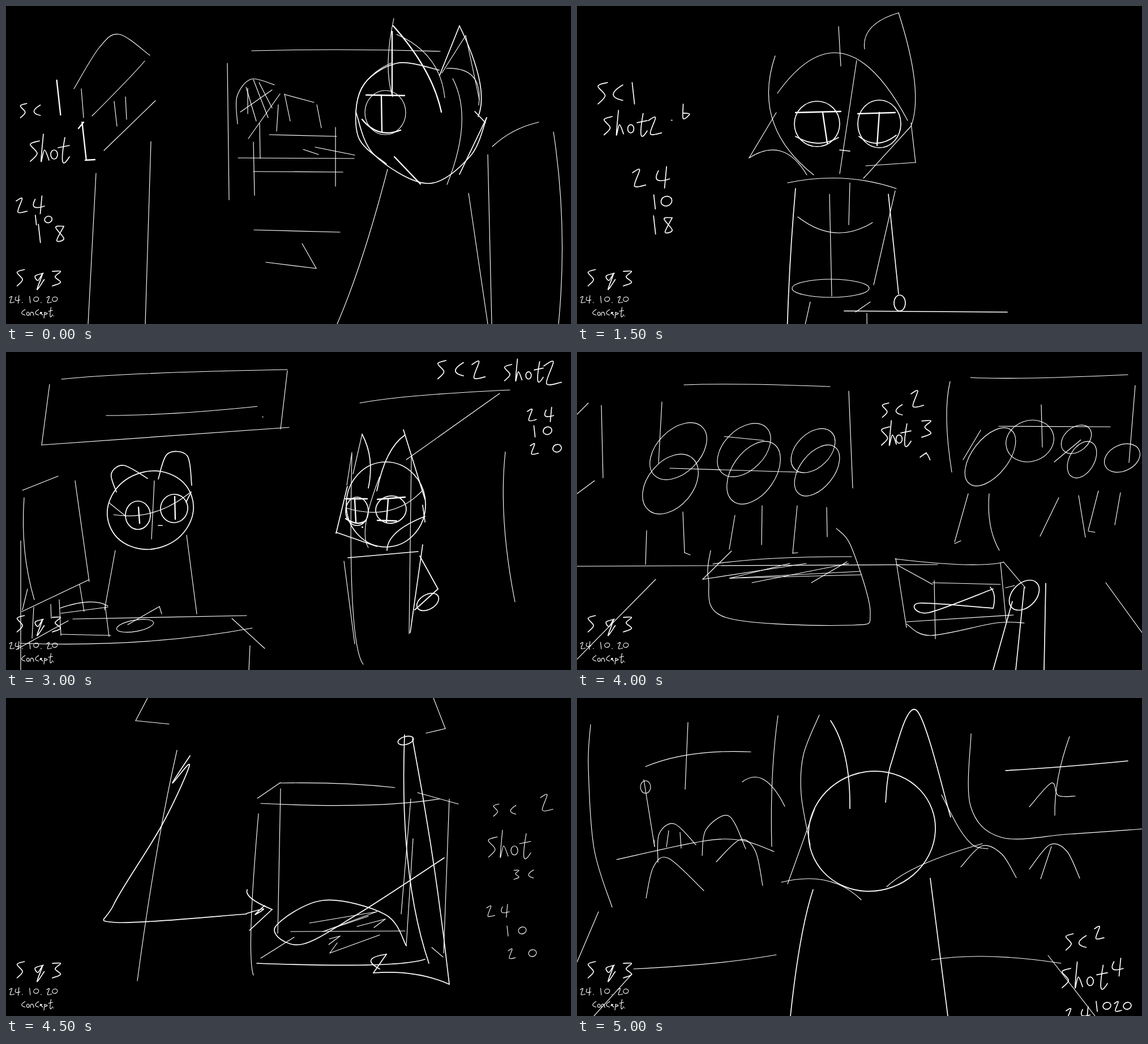
Animation of 998x561 px, one loop 6000 ms. Source, as an HTML page:

```html
<!DOCTYPE html>
<html lang="en">
<head>
<meta charset="utf-8">
<title>Storyboard sketch</title>
<style>
html, body { margin: 0; width: 100%; height: 100%; overflow: hidden; background: #000; }
svg { display: block; width: 100%; height: 100%; }
path, ellipse { fill: none; stroke: #fff; stroke-linecap: round; stroke-linejoin: round; vector-effect: non-scaling-stroke; }
</style>
</head>
<body>
<svg id="stage" viewBox="0 0 998 561"></svg>
<script>
// Line, parabola or smooth curve through the points
function curve(str) {
  const p = str.split(' ').map(q => q.split(',').map(Number));
  const [a, m, b] = p;
  if (p.length === 2) return `<path d="M${a}L${m}"`;
  if (p.length === 3) {
    const c = m.map((v, i) => 2 * v - (a[i] + b[i]) / 2);
    return `<path d="M${a}Q${c} ${b}"`;
  }
  const d = p.slice(1).map((q, i) => {
    const r = p[i], before = p[i - 1] || r, after = p[i + 2] || q;
    const h1 = r.map((v, k) => v + (q[k] - before[k]) / 6);
    const h2 = q.map((v, k) => v - (after[k] - r[k]) / 6);
    return `C${h1} ${h2} ${q}`;
  });
  return `<path d="M${a}${d.join('')}"`;
}

// "o cx cy rx ry angle"
function oval(str) {
  const [, x, y, rx, ry, r = 0] = str.split(' ');
  return `<ellipse cx="${x}" cy="${y}" rx="${rx}" ry="${ry}" transform="rotate(${r} ${x} ${y})"`;
}

const pen = w => str => str.split('|')
  .map(s => (s[0] === 'o' ? oval(s) : curve(s)) + ` stroke-width="${w}"/>`).join('');
const thin = pen(1.15), mid = pen(1.7), bold = pen(2.3);
const place = (x, y, k, part) => `<g transform="translate(${x} ${y}) scale(${k})">${part}</g>`;

// Handwriting, each letter about 10 by 20
const glyphs = {
  s: '9,0 1,3 7,11 1,18', c: '9,2 1,10 9,15', h: '4,-6 2,18 5,8 9,17',
  o: 'o 5 12 3 4', t: '6,-3 4,18 10,14|0,6 10,4', q: '10,4 1,7 4,12 9,5 3,22 11,11',
  a: '7,6 0,11 7,7 11,14', b: '1,0 1,16 8,11 1,10', d: '8,0 8,16 1,13 8,9',
  n: '0,16 1,9 6,9 8,16', p: '2,8 0,22|1,9 8,11 2,14', e: '1,12 6,9 2,9 8,15',
  0: 'o 5 8 7 6 -20', 1: '4,0 6,18', 2: '0,4 7,1 2,17 13,16',
  3: '0,2 9,2 3,8 9,14 0,18', 4: '1,2 0,11 12,10|9,-2 7,19',
  8: '9,2 1,3 9,14 2,16 9,2', '.': '1,17 2,17'
};
const write = (str, x, y, k, step = 0, ink = mid) =>
  [...str].map((ch, i) => place(x + i * step, y, k, ink(glyphs[ch]))).join('');

const label = write('sq3', 18, 465, 1.6, 32) + write('24.10.20', 6, 512, .65, 11, thin) +
  write('concept.', 27, 534, .75, 8, thin);

const opening =
  write('sc', 24, 172, 1.4, 24) + write('1', 76, 131, 3.4, 0, bold) + write('shot', 41, 238, 2, 17) +
  write('1', 120, 205, 3.6, 0, bold) + bold('128,216 137,205|140,272 157,271') +
  write('24', 18, 338, 1.5, 32) + write('10', 48, 369, .95, 22) + write('18', 50, 385, 1.8, 36) +
  // pillar
  thin('120,146 165,73 200,50 254,87|133,146 137,197|152,194 212,133 245,97|191,168 196,212|211,160 213,200') +
  thin('173,255 264,167|159,295 145,561|256,239 246,561') +
  // window and fan
  thin('391,101 394,342|434,79 600,77 767,80|409,208 408,160 433,129 474,139|437,130 463,197|424,143 442,203|427,145 427,190') +
  thin('414,187 470,148|447,135 470,180|428,234 484,155|492,155 502,203|492,156 544,170|549,174 557,215|481,174 478,221') +
  thin('448,207 449,269|437,240 439,334|465,227 584,230|582,214 582,318|410,268 615,269|437,292 595,293') +
  thin('438,395 590,399|459,452 548,463|548,463 523,419|525,253 552,262|546,249 616,263') +
  // head
  mid('765,113 690,101 628,145 622,230 672,279|618,187 650,262 745,313 820,265 849,197|828,186 847,206|849,197 801,297') +
  mid('801,35 836,130 834,195|766,122 801,35') +
  thin('682,100 635,135 618,187|778,110 825,125 835,175|789,128 805,210 779,315|770,118 812,52|812,52 836,165') +
  thin('685,22 675,100 683,160|690,50 750,95 775,162|o 670 188 36 39') +
  bold('682,45 682,158|684,35 740,112 769,187|636,157 704,158|663,157 664,222|629,200 660,222 697,219|686,266 732,314') +
  // body and chair
  thin('674,288 630,440 585,561|817,330 851,561|851,262 858,561|859,248 897,221 941,205|967,222 982,390 976,561');

const room =
  thin('146,80 277,56|734,50 759,50|510,0 513,59|381,65 607,59|369,69 376,92 396,102|610,51 572,108|407,102 485,109 566,104') +
  thin('94,262 125,244 220,232 356,248|88,276 76,370 95,561|180,310 246,306|0,125 12,227|33,317 0,412|128,121 150,157') +
  thin('963,76 920,180 891,302|895,298 992,438|854,99 827,157');
const catHead =
  thin('396,102 398,137|419,122 425,103 449,90|449,90 463,150 460,190|342,161 400,126 457,185|340,128 338,185 374,233') +
  thin('412,132 397,232|460,190 418,236|341,178 317,218|317,218 345,212 368,233|460,187 464,222|464,222 420,225') +
  mid('o 377 188 20 20|o 432 188 19 21|358,199 377,205 396,200|414,199 430,205 447,198|397,211 406,212') +
  bold('358,178 398,177|413,179 446,178|382,178 386,205|432,178 430,207');
const catBody =
  thin('351,240 400,236 447,245|406,240 405,277|388,250 390,340|360,270 393,284 426,275|446,247 427,330|o 389 333 34 8') +
  thin('371,345 352,430|421,355 422,450|380,436 537,440|411,354 424,345|380,477 364,561|543,466 557,561') +
  mid('440,250 449,338|358,245 350,400 353,561|o 450 346 5 7|401,353 545,354');
const bear =
  mid('588,160 587,104 620,90 690,112|706,106 760,82 792,120 783,172|o 689 194 111 97|o 639 225 31 40|o 730 220 38 46 10') +
  mid('692,206 750,182|640,200 638,240 645,275|718,195 718,270|541,282 612,275|745,272 808,231|733,285 800,375') +
  thin('580,185 600,275 648,335|775,198 765,290 722,366|560,220 670,198 782,193|597,184 640,203|676,250 685,382') +
  thin('638,343 765,326|614,358 645,385 690,397|687,413 749,360|572,222 563,400 575,561') +
  mid('640,312 604,346|591,376 612,352|607,345 570,520|696,398 704,561|559,548 605,460 700,428 805,455 847,534') +
  mid('808,229 800,380 821,552|o 781 364 17 11 -40|792,336 820,485|797,355 843,488|843,488 806,489|o 580 506 6 9|o 812 495 9 9') +
  mid('803,459 802,510 770,537 743,462 755,451 803,449|772,446 773,435');
const roomText =
  write('sc1', 35, 135, 2.1, 27) + write('shot2', 46, 195, 1.8, 20) + write('.', 165, 176, 1.5) +
  write('24', 98, 287, 1.8, 44) + write('10', 130, 333, 1.4, 21) + write('18', 128, 370, 1.8, 24);

const car =
  thin('1,268 73,273|73,273 216,141|226,142 513,148|509,142 544,266|536,262 558,260|220,187 323,180|323,201 320,312') +
  thin('113,334 220,335 339,316|279,278 280,317|373,185 372,300 386,412|381,171 462,211|481,195 504,415|541,280 532,388') +
  thin('4,458 323,461|322,451 420,453 495,443|o 143 512 84 85|310,425 345,410 390,405|o 393 491 70 86') +
  // driver
  thin('o 237 253 53 52 -30|225,222 232,195 255,180 282,228|161,318 200,222|200,222 186,262|144,325 148,295 163,315|178,332 192,306|232,306 218,318') +
  mid('90,314 236,173|o 224 256 24 29 20|215,268 217,245 231,231|148,325 230,306|150,330 200,309 275,278|557,270 458,310|o 469 314 12 5 -15');
const walker =
  thin('580,183 573,130 586,72|614,104 620,150|655,160 665,112 703,93 716,150|736,98 735,150|565,268 548,340 553,404|692,240 704,393') +
  thin('609,402 655,384 715,407|o 612 428 62 13 -4|620,398 618,428|570,430 594,422 580,438 615,430|576,452 577,561|577,453 584,449|676,428 690,561') +
  mid('579,63 618,87 638,130|631,143 723,63|723,63 707,175|o 640 195 71 62 -15|573,178 560,243|560,243 615,266|705,150 723,237|723,237 647,264') +
  mid('638,122 624,200 634,251|622,248 632,238 650,242|608,236 614,234|o 597 206 18 21|o 654 199 25 28') +
  bold('580,187 618,186|628,186 676,183|597,188 597,228|653,176 652,224|584,222 615,224|634,217 653,228 674,216');
const turned =
  thin('861,155 863,120 885,88|920,80 921,140|902,138 855,205|o 937 183 55 55|848,222 928,247|890,236 879,370|953,419 965,421|965,421 995,561') +
  mid('o 952 175 25 18 -15|931,160 977,156|951,158 950,188|761,287 805,294 855,287|850,273 855,300 840,316') +
  mid('876,408 920,391 972,443|905,409 890,460 888,561');
const carText =
  write('24', 27, 46, 1.6, 44) + write('10', 53, 85, 1.4, 25) + write('20', 46, 121, 1.1, 35) +
  write('sc2', 188, 66, 1.6, 23) + write('shot', 206, 105, 1.5, 20) + write('1', 288, 87, 2, 0, bold) +
  bold('290,95 296,87|291,124 310,124');

const counter =
  thin('98,48 250,38 497,31|497,33 485,136|77,57 63,164|63,164 500,133|177,112 300,108 444,96|453,114 454,115') +
  thin('29,244 92,219|32,257 33,350 50,437|122,227 147,405|28,458 146,402|26,333 26,561|130,410 138,458|95,452 145,441 180,448') +
  thin('38,418 29,455|97,461 180,450|79,445 80,470|94,437 97,500|49,450 46,505|118,471 425,465|97,498 185,500|175,446 182,502') +
  thin('18,525 110,474|26,514 240,511 435,487|399,470 457,523|431,518 429,561') +
  thin('193,350 174,455|319,323 337,462|o 228 483 33 10 -10|215,481 271,449|271,449 275,462');
const clerk =
  mid('o 255 279 77 68 -20|195,247 186,215 208,200 250,223|269,224 285,180 320,183 328,235|o 233 288 22 25|o 297 276 24 25 10') +
  mid('318,265 327,247|269,306 276,306') +
  thin('190,287 260,283 325,248|182,266 212,290|262,227 257,330') + bold('234,274 236,302|298,255 299,295');
const guest =
  thin('602,235 611,177|613,215 629,145|660,220 636,300 640,345|600,275 675,280 735,245|611,180 612,440 631,551|716,185 712,497') +
  thin('597,369 616,515|625,90 730,77 890,67|872,73 707,190|882,176 880,300 899,441') +
  mid('629,145 643,190 640,240|655,245 675,183 704,147|702,137 740,260|o 671 269 70 75|603,237 583,320|583,318 655,343|736,270 740,300') +
  mid('740,290 690,318 673,350|o 620 281 20 25|o 680 278 27 24 -10|604,363 728,352|736,340 714,495|731,360 763,418|763,418 722,455|o 745 441 21 13 -30') +
  bold('600,259 638,259|656,260 705,256|616,260 618,300|675,260 672,300|600,294 620,302 636,297|656,297 690,298|629,309 630,309');
const counterText =
  write('sc2', 761, 15, 1.8, 31) + write('shot', 879, 22, 1.6, 18) + write('2', 950, 15, 2.4) +
  write('24', 921, 100, 1.2, 32) + write('10', 928, 130, 1.1, 23) + write('20', 926, 161, 1.1, 42);

const crowd =
  thin('0,110 20,90|43,94 46,222|0,250 31,227|189,58 300,57 447,61|150,88 144,196|480,69 487,240|164,205 391,212|260,149 330,156') +
  thin('123,315 121,375|187,282 190,354|190,354 200,358|279,288 269,348|327,271 326,340|389,271 381,355|381,355 390,354|441,274 442,326|139,401 0,542') +
  thin('o 179 175 60 38 -45|o 165 233 60 40 -50|o 295 173 56 36 -45|o 312 213 62 38 -55|o 417 174 46 30 -45|o 424 209 52 30 -52');
const basket =
  thin('0,378 637,375|236,350 232,400 262,468 480,482 518,460 485,345 458,311|240,374 350,364 485,361') +
  thin('273,351 222,401|222,401 405,373|376,373 270,399|270,399 500,387|309,407 480,373|414,407 477,370|270,399 502,393');
const queue =
  thin('695,45 800,46 973,40|659,52 653,120 662,212|986,59 975,195|745,131 942,132|820,93 822,168|691,250 667,335|667,338 678,333') +
  thin('728,250 730,305 746,350|851,257 818,325|886,253 898,327|921,245 903,315|903,316 915,318|960,248 950,305|934,407 998,495') +
  thin('o 730 185 60 32 -52|o 800 157 43 36 -20|o 882 154 30 21 -40|843,194 890,155|o 892 190 35 22 -60|o 963 187 33 23 -25|713,138 682,190');
const crate =
  thin('562,365 680,375 753,371|563,364 582,486|566,376 628,410|753,370 792,416|748,372 758,475|628,407 748,410|631,403 633,506') +
  thin('582,476 771,464|582,480 625,500 740,478 790,478|757,416 773,412') +
  mid('735,418 620,460 605,443 735,452|735,452 737,430 730,415|o 790 429 31 21 -45|769,440 735,561|790,415 775,561|828,408 825,561');
const crowdText =
  write('sc', 538, 90, 1.4, 24) + write('2', 590, 67, 1.7) + write('shot', 536, 132, 1.8, 12) +
  write('3', 609, 118, 1.8) + write('a', 606, 168, 1.6);

const tank =
  thin('250,0 229,40|229,40 288,46|755,0 776,54|776,54 742,62|302,92 265,280 232,499|444,177 485,149|485,150 590,151 687,158') +
  thin('450,186 630,189 766,178|727,167 799,187|446,204 433,400 437,489|485,160 480,415|783,178 773,450|715,178 698,381|719,248 707,437') +
  thin('752,440 772,457|450,459 509,422|503,412 705,411') +
  // arms
  mid('325,102 294,150 324,119 275,225 190,365 195,396 425,381|426,338 434,354 470,373|470,373 430,410|425,380 455,372 440,382 457,366') +
  mid('o 706 75 14 7 -15|704,65 710,290 747,468|718,72 755,290 783,505|783,505 720,487 649,485|649,485 672,452|672,452 645,462 660,478') +
  // water
  mid('707,437 670,382 560,357 475,405 520,435 620,382 774,282|443,468 640,471 740,461') +
  thin('536,397 655,377|655,377 560,412|560,412 640,385|571,425 590,420|590,420 570,435|585,432 572,450|572,450 660,418|620,403 670,390|670,390 650,405');
const tankText =
  write('sc', 860, 187, 1.2, 30, thin) + write('2', 944, 169, 1.7, 0, thin) + write('shot', 850, 245, 2, 19, thin) +
  write('3', 897, 302, 1, 0, thin) + write('24', 849, 366, 1.1, 27, thin) +
  write('10', 881, 402, 1, 26, thin) + write('20', 887, 442, 1, 38, thin);
const take = ch => write(ch, 922, 301, 1.1, 0, thin);

const finale =
  thin('24,47 20,120 30,265 62,369|196,43 191,161|121,121 205,99 307,95|355,31 345,140 344,262|70,285 220,253 290,251 348,271') +
  thin('o 121 157 9 11|118,144 137,262|137,262 136,250|143,290 145,240 172,222 210,259|162,234 158,263|182,237 184,265') +
  thin('221,278 228,232 268,208 298,266|246,289 288,250 315,270 328,331|122,353 135,298 162,283 224,340|292,148 330,144 367,191') +
  thin('38,377 0,466|100,478 240,468 352,453|97,487 30,561|626,462 730,456 855,468') +
  // cat
  thin('428,30 400,100 396,170 412,260|644,171 675,230 700,260 726,266|420,195 372,328|361,325 440,322 502,356|547,333 610,294 716,257') +
  mid('448,40 474,105 482,195|o 521 235 113 105 -20|545,184 555,115 600,22 660,210|417,338 395,430 377,561|624,318 655,561|757,128 860,121 973,111') +
  // right side
  thin('696,63 695,190 750,246 870,240 998,231|870,68 850,140 844,207|799,192 838,150 850,172 880,173|678,298 715,261 750,275 776,317') +
  thin('799,302 835,259 865,270 888,318|838,262 819,319|832,454 915,561') +
  write('sc', 862, 416, 1.6, 23) + write('2', 914, 402, 1.3) + write('shot', 855, 477, 1.9, 21) + write('4', 947, 462, 1.5) +
  write('24', 864, 547, 1.2, 28) + write('1020', 913, 535, 1, 18);

const scenes = [
  [0, opening],
  [1000, room + catHead + catBody + bear + roomText + write('a', 186, 173, 1.6)],
  [1500, place(-330, -168, 2, catHead + catBody) + roomText + write('b', 186, 173, 1.6)],
  [2000, car + walker + turned + carText],
  [3000, counter + clerk + guest + counterText],
  [4000, crowd + basket + queue + crate + crowdText],
  [4250, place(-920, -728, 2.05, crate) + tankText + take('b')],
  [4500, tank + tankText + take('c')],
  [4750, place(0, -40, 1.6, crowd) + tankText + take('d')],
  [5000, finale]
];
const LOOP = 6000;

const stage = document.getElementById('stage');
stage.innerHTML = '<rect width="998" height="561"/>' +
  scenes.map(s => `<g class="scene" display="none">${s[1]}</g>`).join('') + label;
const groups = [...stage.querySelectorAll('.scene')];

function draw() {
  const t = performance.now() % LOOP;
  let now = 0;
  scenes.forEach((s, i) => { if (t >= s[0]) now = i; });
  groups.forEach((g, i) => g.setAttribute('display', i === now ? 'inline' : 'none'));
  requestAnimationFrame(draw);
}
draw();
</script>
</body>
</html>
```
